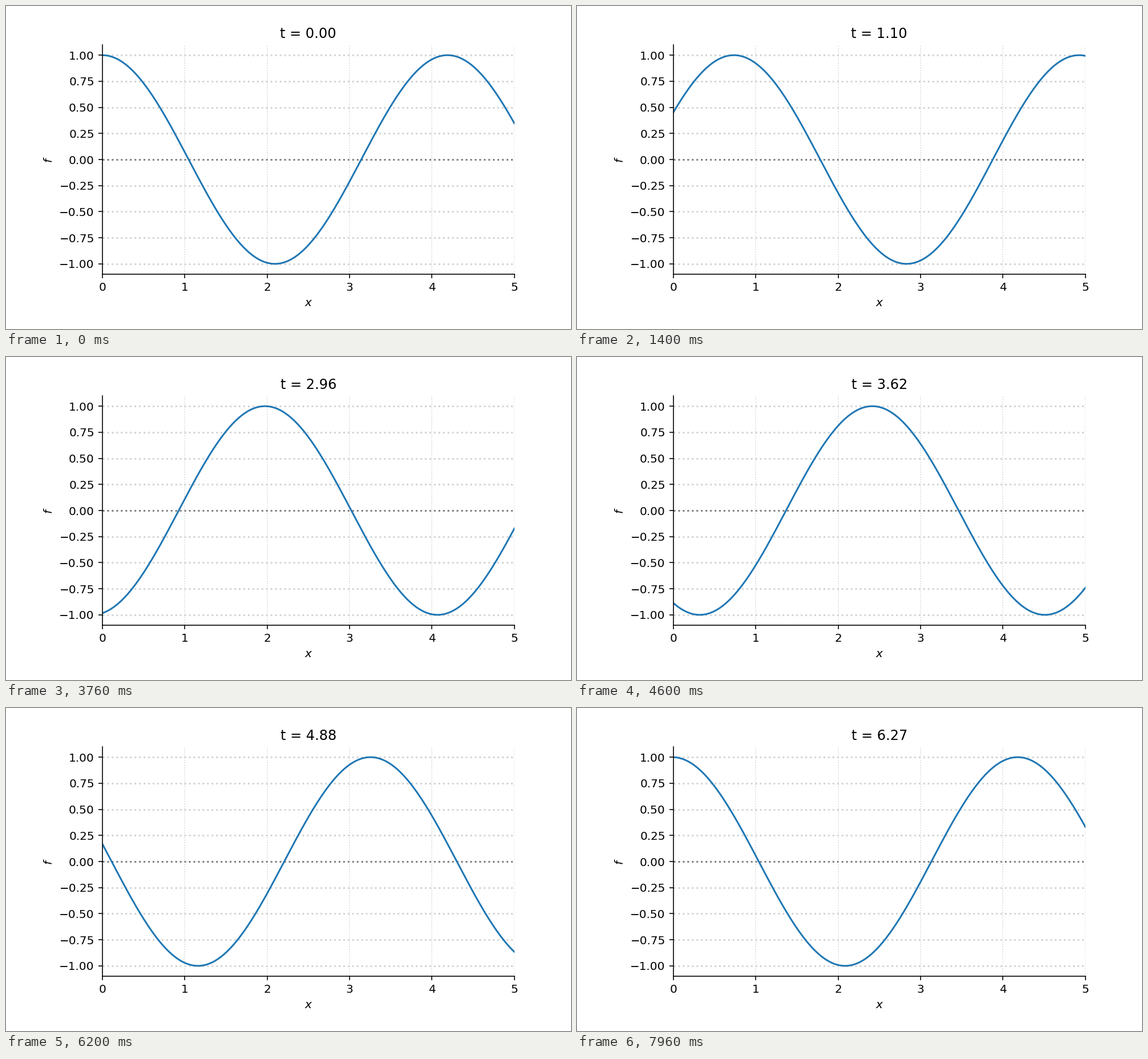
Animation of 990 by 566 pixels, one loop 8000 ms. Source, as a matplotlib script:

```python
import numpy as np
import matplotlib.pyplot as plt
from matplotlib.animation import FuncAnimation

W, H, DPI = 990, 566, 144
FRAMES, INTERVAL = 200, 40
STEP = 4 * np.pi / 399
LEFT, RIGHT, TOP, BOTTOM = 168.8, 890.8, 67.9, 470.1

plt.rcParams["font.family"] = "DejaVu Sans"
fig = plt.figure(figsize=(W / DPI, H / DPI), dpi=DPI, facecolor="white")
ax = fig.add_axes([LEFT / W, 1 - BOTTOM / H,
                   (RIGHT - LEFT) / W, (BOTTOM - TOP) / H])
ax.set(xlim=(0, 5), ylim=(-1.1, 1.1), xlabel="$x$", ylabel="$f$",
       xticks=range(6), yticks=np.linspace(-1, 1, 9))
ax.spines[["top", "right"]].set_visible(False)
ax.set_axisbelow(True)
ax.grid(axis="x", color="lightgray", linestyle=":", linewidth=0.8)
ax.grid(axis="y", color="lightgray", linestyle=":", linewidth=1.5)
ax.axhline(0, color="gray", linestyle=":", linewidth=1.5)

x = np.linspace(0, 5, 200)
curve, = ax.plot(x, np.cos(1.5 * x), color="tab:blue", linewidth=1.5)
title = ax.set_title("t = 0.00")


def update(i):
    t = i * STEP
    curve.set_ydata(np.cos(1.5 * x - t))
    title.set_text(f"t = {t:.2f}")
    return curve, title


anim = FuncAnimation(fig, update, frames=FRAMES, interval=INTERVAL,
                     repeat=True, repeat_delay=0)
plt.show()
```
